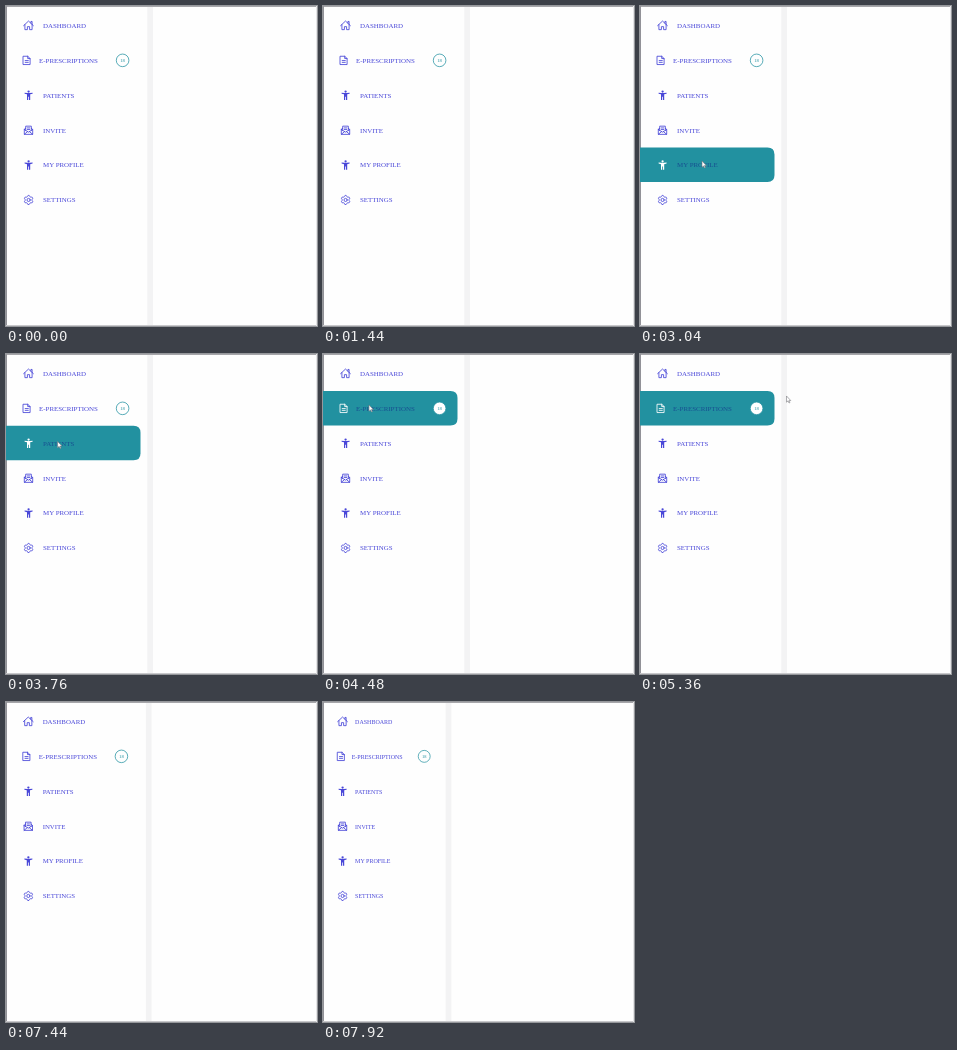
An HTML page that plays this animation: 311x320 px, repeating every 8000 ms.

```html
<!DOCTYPE html>
<html lang="en">
<head>
<meta charset="utf-8">
<style>
html, body { margin: 0; width: 100%; height: 100%; overflow: hidden; background: #fefefe; }
svg { display: block; width: 311px; height: 320px; }
text { font-family: "Liberation Serif", "Times New Roman", serif; }
.icon { fill: none; stroke: currentColor; stroke-width: .85; stroke-linejoin: round; stroke-linecap: round; }
.solid { fill: currentColor; stroke: none; }
</style>
</head>
<body>
<svg id="stage" viewBox="0 0 311 320" xmlns="http://www.w3.org/2000/svg">
  <rect width="311" height="320" fill="#fefefe"/>
  <rect id="bar" y="1" width="5.7" height="318" fill="#f3f3f4"/>
  <path d="M0 .5H311" stroke="#a6a6aa"/>
  <path d="M.5 0V320" stroke="#929298"/>
  <path d="M0 319.5H311" stroke="#c8c8cb"/>
  <path d="M310.5 0V320" stroke="#e4e4e6"/>
  <path id="pill" fill="#2291a0"/>
  <g id="menu"></g>
  <path id="cursor" d="M0 0V6.2L1.5 4.9L2.5 7L3.4 6.6L2.4 4.6H4.3Z" fill="#fff" stroke="#77777c" stroke-width=".6"/>
</svg>
<script>
const LOOP = 8000, ROW = 34.9, TOP = 2, NARROW = 0.868;
const INK = '#4947d8', TEAL = '#2291a0', HOVER_INK = '#174f91';

const person = `<circle class="solid" cy="-3.7" r="1.15"/>
  <path class="solid" d="M-4-2.5L-1.3-2.2H1.3L4-2.5V-1.5L1.6-.9V4.7H.4V1.4H-.4V4.7H-1.6V-.9L-4-1.5Z"/>`;
const teeth = Array.from({ length: 48 }, (_, i) => {
  const a = i / 48 * 2 * Math.PI, r = 4 + 0.55 * Math.tanh(3 * Math.cos(6 * a));
  return (r * Math.sin(a)).toFixed(2) + ' ' + (r * Math.cos(a)).toFixed(2);
}).join('L');
const icons = {
  house: '<path d="M-4.9.2L0-4.4L4.9.2M-3.6-.8V4.2H-1.1V1.2H1.1V4.2H3.6V-.8M2.4-2.4V-4H3.6V-1.2"/>',
  paper: '<path d="M-3.3-4.1H1L3.4-1.8V4.2H-3.3ZM1-4.1V-1.8H3.4M-1.5.2H1.6M-1.5 2H1.6"/>',
  person,
  letter: '<path d="M-4.2-.8V4.2H4.2V-.8L2.8-1.9M-4.2-.8L-2.8-1.9M-2.8.3V-4H2.8V.3M-4.2-.6L0 2L4.2-.6M-4.2 4.2L-1 1.5M4.2 4.2L1 1.5M-1.2-2.2H1.2M-1.2-.6H1.2"/>',
  gear: `<path d="M${teeth}Z"/><circle r="1.6"/>`
};
const items = [
  ['DASHBOARD', 'house', 22.5, 37],
  ['E-PRESCRIPTIONS', 'paper', 20.7, 33],
  ['PATIENTS', 'person', 22.6, 37],
  ['INVITE', 'letter', 22.5, 37],
  ['MY PROFILE', 'person', 22.6, 37],
  ['SETTINGS', 'gear', 22.6, 37]
];
// time, x, y of the pointer
const path = [
  [1920, 90, 323], [2400, 75, 200], [2800, 62, 155], [3100, 62, 155],
  [4200, 46, 51], [4480, 46, 51], [4760, 60, 18], [5100, 80, 48],
  [5360, 146.5, 42], [5700, 175, -9]
];

const $ = id => document.getElementById(id);
const rowY = i => TOP + ROW * (i + 0.5);
const ease = u => u * u * (3 - 2 * u);
const clamp = u => Math.max(0, Math.min(1, u));
const set = (el, attrs) => { for (const k in attrs) el.setAttribute(k, attrs[k]); };

$('menu').innerHTML = items.map(([label, icon]) =>
  `<g><g class="icon">${icons[icon]}</g><text>${label}</text></g>`).join('') +
  `<g id="badge"><circle r="6.3" stroke="${TEAL}" stroke-width=".75"/>
   <text y="1.6" font-size="4.7" text-anchor="middle" fill="${TEAL}">18</text></g>`;
const rows = [...$('menu').children].slice(0, items.length);

function pointer(t) {
  const n = path.findIndex(p => p[0] > t);
  if (n < 1) return null;
  const [a, b] = [path[n - 1], path[n]];
  const u = ease((t - a[0]) / (b[0] - a[0]));
  return [a[1] + (b[1] - a[1]) * u, a[2] + (b[2] - a[2]) * u];
}

function draw(t) {
  const s = 1 - (1 - NARROW) * ease(clamp((t - 7360) / 480));
  const pos = pointer(t);
  let active = -1;
  if (pos && pos[0] < 148 && pos[1] > TOP) active = Math.floor((pos[1] - TOP) / ROW);

  set($('bar'), { x: 141.3 * s });
  items.forEach(([, , iconX, textX], i) => {
    const on = i === active, [icon, label] = rows[i].children;
    set(icon, { transform: `translate(${iconX * s} ${rowY(i)})`, color: on ? '#fff' : INK });
    set(label, { x: textX * s, y: rowY(i) + 2.4, 'font-size': 6.93 * s, fill: on ? HOVER_INK : INK });
  });
  set($('badge'), { transform: `translate(${116.6 * s} ${rowY(1)}) scale(${0.6 + 0.4 * s})` });
  set($('badge').firstElementChild, { fill: active === 1 ? '#fff' : 'none' });

  const shown = active >= 0 && active < items.length;
  set($('pill'), {
    d: `M0 ${TOP + ROW * active}H${134.5 * s - 7}q7 0 7 7v${ROW - 14.4}q0 7-7 7H0Z`,
    visibility: shown ? 'visible' : 'hidden'
  });
  set($('cursor'), {
    visibility: pos ? 'visible' : 'hidden',
    transform: pos ? `translate(${pos})` : ''
  });
}

const start = performance.now();
function tick() {
  draw((performance.now() - start) % LOOP);
  requestAnimationFrame(tick);
}
draw(0);
requestAnimationFrame(tick);
</script>
</body>
</html>
```
